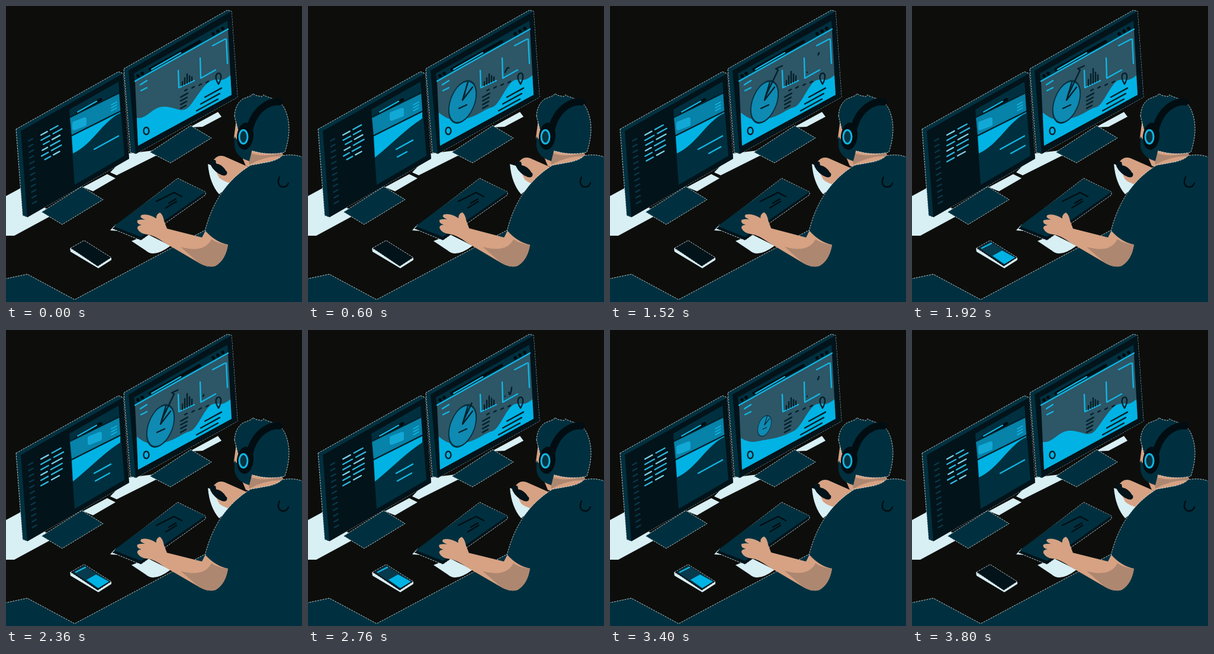
Write an HTML page that moves like this. It is 500 px wide and 500 px high and loops after 3.84 s.

```html
<!DOCTYPE html>
<html lang="en">
<head>
<meta charset="utf-8">
<title>Developer at a desk</title>
<style>
html, body { margin: 0; width: 100%; height: 100%; overflow: hidden; background: #0d0e0c; }
svg { display: block; width: 100vw; height: 100vh; }
.navy { fill: #00303f; }
.dark { fill: #03131a; }
.light { fill: #d8eff4; }
.skin { fill: #d6a283; }
.shade { fill: #ae8770; }
.cyan { fill: #00b3e4; }
.ln { fill: none; stroke-linecap: round; stroke-linejoin: round; stroke-width: 2.4; }
.c { stroke: #12b5e2; }
.k { stroke: #04202a; }
.b { stroke: #020d12; }
.edge { stroke: #e6f1f1; stroke-width: .8; stroke-dasharray: 3 1.5; }
</style>
</head>
<body>
<svg viewBox="0 0 500 500">
  <!-- desk -->
  <path class="navy edge" d="M-2 461L36 453L116 496L345 374L420 502H-2Z"/>
  <g class="light">
    <path d="M0 321L24 308L75 348V355L14 388H0Z"/>
    <path d="M130 306L171 284L185 291L147 313Z"/>
    <path d="M176 281L207 249L250 244L263 248L187 286Z"/>
    <path d="M310 205L358 179L364 187L332 204Z"/>
    <path d="M176 379L185 369L190 380Z"/>
    <path d="M212 397L240 386L278 405Q250 426 236 413Z"/>
    <path d="M341 267Q344 300 360 318L384 298L365 274Z"/>
  </g>

  <!-- left monitor -->
  <path class="navy edge" d="M60 348L128 305L164 327L95 369Z"/>
  <path class="navy edge" d="M17 208L190 111L198 114L208 258L36 357L28 354Z"/>
  <path class="dark" d="M25 211L198 114L208 258L36 357Z"/>
  <path class="navy" d="M107 175L190 128L200 253L116 302Z"/>
  <path class="ln b" style="stroke-width:5" d="M121 180L160 158"/>
  <path class="ln c" d="M121 179L153 161"/>
  <path id="band" d="M108 188L191 147L193 177L111 218Z"/>
  <path id="card" d="M-9 -1L9 -8V1L-9 8Z" stroke-width="6" stroke-linejoin="round"/>
  <path id="hill" class="cyan"/>
  <path class="ln k" d="M108 188L191 147M111 219L193 178"/>
  <path id="menu" class="ln c" style="stroke-width:1.6"/>
  <path id="pageLines" class="ln c"/>
  <path id="numbers" class="ln" stroke="#07384a"/>
  <g id="code" class="ln"></g>

  <!-- right monitor -->
  <path class="navy edge" d="M243 247L312 202L347 223L278 265Z"/>
  <path class="navy edge" d="M199 106L374 7L381 9L391 154L219 250L210 247Z"/>
  <path class="dark" d="M207 109L381 9L391 154L219 250Z"/>
  <path class="navy" d="M216 114L374 25L375 40L218 129Z"/>
  <path d="M218 128L375 40L381 150L223 236Z" fill="#2d5666"/>
  <path class="ln b" style="stroke-width:5" d="M243 107L327 60"/>
  <path class="ln c" d="M246 107L295 79"/>
  <path id="dots" class="ln b" style="stroke-width:6"/>
  <path id="wave" class="cyan"/>
  <path class="ln c" d="M218 127L375 39M227 133L238 126M228 143L238 138M349 67L370 56M372 56L374 97M291 109L292 138L318 126M328 88L329 122L354 108"/>
  <path id="labels" class="ln k"/>
  <path class="ln k" d="M359 132Q352 121 356 115Q361 111 363 117Q364 123 359 132Z"/>
  <ellipse class="ln k" cx="237" cy="211" rx="4.5" ry="6"/>
  <path id="bars" class="ln k"/>
  <path id="spark" class="ln k" pathLength="100" d="M333 112Q336 104 339 104Q340 111 342 108Q345 98 344 86Q346 78 348 83Q349 90 353 79"/>
  <g id="pie">
    <circle r="29" transform="matrix(.8 -.48 0 1.12 0 0)" fill="#0f8ab2" stroke="#063140" stroke-width="2.4"/>
    <path class="ln k" d="M9 -33L0 -3L17 -25M-6 11L7 5"/>
  </g>
  <path id="leader" class="ln k" pathLength="100" d="M263 152L284 108L280 106L291 101"/>

  <!-- keyboard and phone -->
  <path class="dark edge" d="M179 376L290 291L337 314V319L228 396Z"/>
  <path class="navy" d="M182 372L290 292L337 314L228 390Z"/>
  <path class="ln b" d="M254 330L284 315L297 322M270 341L288 330M275 333L287 326"/>
  <path class="light" d="M108 409L155 437L178 425V429L156 443L109 415Z"/>
  <path class="dark edge" d="M109 409L132 396L178 425L155 440Z"/>
  <g id="phone">
    <path d="M113 409L132 398L175 424L155 437Z" fill="#073a4c"/>
    <path class="cyan" d="M136 422L152 413L174 425L156 436Z"/>
    <path class="ln c" d="M118 409L134 401"/>
  </g>

  <!-- person -->
  <g id="mouseHand">
    <path class="skin" d="M349 263Q356 250 369 254L412 273L384 301Q366 296 360 290L352 274Z"/>
    <ellipse class="dark" cx="359" cy="273" rx="18" ry="8" transform="rotate(42 359 273)"/>
    <path class="skin" d="M354 260Q364 250 378 260L386 282L372 279Q366 268 355 266Z"/>
  </g>
  <path class="skin" d="M389 192L385 222L405 270L416 274L469 255L464 240Z"/>
  <path class="shade" d="M408 247Q438 258 466 246L469 254Q440 252 411 268Z"/>
  <path class="navy edge" d="M502 256Q487 249 466 253Q461 259 446 263L413 269Q353 306 335 385L340 440L230 502H502Z"/>
  <path class="navy" d="M330 392L337 440L230 500H350Z"/>
  <g id="arm">
    <path class="skin" d="M222 376Q221 371 229 370Q220 368 222 362Q228 360 235 361Q224 357 229 353Q240 350 254 359Q253 352 260 349Q265 352 267 363L272 376L331 391L337 380Q354 399 375 403Q371 429 354 439Q342 443 326 434L268 400Q250 387 239 386Q226 385 222 376Z"/>
    <path class="shade" d="M295 407Q335 418 347 394Q359 402 375 403Q371 429 354 439Q342 443 326 434Z"/>
  </g>
  <path class="navy edge" d="M386 186Q387 166 400 157L415 151L417 148L422 151L432 153L435 150L440 153Q465 160 471 174Q485 205 471 247Q440 254 408 242L393 214Z"/>
  <path class="navy" d="M386 220Q391 230 403 230L416 242L411 262Q389 256 386 237Z"/>
  <path class="ln b" style="stroke-width:12" d="M411 210Q417 183 435 170Q449 160 462 162"/>
  <ellipse cx="404" cy="220" rx="14" ry="23" fill="#020d12" transform="rotate(6 404 220)"/>
  <ellipse class="c" cx="401" cy="221" rx="7" ry="11.5" fill="#063341" stroke-width="3"/>
  <path class="ln b" d="M462 289Q457 300 464 305Q474 308 477 299"/>
</svg>
<script>
const LOOP = 3840, HALF = LOOP / 2;
const $ = id => document.getElementById(id);
const set = (id, name, value) => $(id).setAttribute(name, value);
const show = (id, visible) => set(id, 'visibility', visible ? 'visible' : 'hidden');
const mix = (a, b, p) => a + (b - a) * p;
const repeat = (n, draw) => Array.from({length: n}, (_, i) => draw(i)).join('');

// Smooth step from 0 to 1 between two times.
function ease(t, from, to) {
  const p = Math.min(1, Math.max(0, (t - from) / (to - from)));
  return p * p * (3 - 2 * p);
}
const pulse = (t, inFrom, inTo, outFrom, outTo) => ease(t, inFrom, inTo) - ease(t, outFrom, outTo);

let seed = 11;
const random = () => (seed = seed * 16807 % 2147483647) / 2147483647;

// Line that follows the slope of the screens.
const slanted = (x, y, w) => `M${x} ${y}l${w} ${-.55 * w}`;
const dot = (x, y) => `M${x} ${y}h.1`;

set('numbers', 'd', repeat(12, i => slanted(38 + i * .6, 228 + i * 9.6, 7)));
set('menu', 'd', repeat(3, i => slanted(178, 167 + i * 5, 9)));
set('dots', 'd', repeat(2, i => dot(223 + i * 7, 118 - i * 4)) + repeat(3, i => dot(350 + i * 8, 47 - i * 4.5)));
set('labels', 'd',
  repeat(4, i => slanted(295, 154 + i * 6.3, 12 - i)) +
  repeat(4, i => slanted(302 + i * 12, 143 - i * 4.5, 4)) +
  repeat(3, i => slanted(336 - i * 7, 154 + i * 11.5, 28 + i * 4)));

const words = [];
for (let row = 0; row < 6; row++) {
  const indent = random() * 8, first = 9 + random() * 8, second = 12 + random() * 10;
  [first, second].forEach((length, col) => {
    const el = document.createElementNS('http://www.w3.org/2000/svg', 'path');
    el.setAttribute('stroke', (row + col) % 3 ? '#2fb4da' : '#7cd0e4');
    $('code').append(el);
    words.push({el, row, indent, length, offset: col && first + 6});
  });
}

function drawCode(t) {
  const aligned = pulse(t, 1120, 1800, 3400, 3750);
  for (const {el, row, indent, length, offset} of words) {
    const typed = mix(.85 + .08 * Math.sin(2 * Math.PI * t / HALF + row * 2), 1, aligned);
    const shift = indent * (1 - aligned) + offset * typed;
    el.setAttribute('d', slanted(59 + shift, 218 + row * 9 - .55 * shift, length * typed));
  }
}

function drawPage(t) {
  const p = pulse(t % HALF, 150, 450, 1180, 1450);
  set('band', 'fill', '#0782a8');
  set('card', 'fill', '#12a8d5');
  set('card', 'stroke', '#12a8d5');
  set('card', 'transform', `translate(${mix(124, 150, p)} ${mix(199, 183, p)})`);
  set('hill', 'd', `M111 219L193 178V${mix(181, 190, p)}C165 ${mix(193, 208, p)} 145 ${mix(235, 230, p)} 113 ${mix(249, 256, p)}Z`);
  const second = 16 * ease(t, 0, 500) + 8 * ease(t, 1120, 1900) - 24 * ease(t, 2760, 3350);
  set('pageLines', 'd', slanted(149, 242, mix(41, 28, p)) +
    (second > 1 ? slanted(mix(167, 151, p), mix(249, 255, p), second) : ''));
}

function drawCharts(t) {
  const swell = pulse(t, 0, 550, 3250, 3700);
  set('wave', 'd', `M221 ${mix(189, 180, swell)}C238 ${mix(192, 194, swell)} 247 ${mix(170, 194, swell)} 267 ${mix(170, 190, swell)}` +
    `S298 ${mix(184, 174, swell)} 311 ${mix(168, 171, swell)}S336 128 350 125S363 130 379 117L381 150L223 236Z`);

  const pie = pulse(t, 120, 520, 3240, 3560);
  set('pie', 'transform', `translate(261 162) scale(${pie})`);
  const leader = 100 * pulse(t, 520, 1000, 2300, 3200);
  set('leader', 'stroke-dasharray', `${leader} 200`);
  show('leader', leader > 1);

  const rise = 1 + .6 * pulse(t, 1200, 1850, 2000, 3300);
  set('bars', 'd', repeat(5, i => `M${298 + i * 4} ${134 - i * 2}v${-rise * (6 + 9 * Math.sin(i * .8) ** 2)}`));

  // A short stroke travels along the line, twice per loop.
  const head = 100 * ease(t % HALF, 300, 1400), tail = 100 * ease(t % HALF, 500, 1700);
  set('spark', 'stroke-dasharray', `0 ${tail} ${head - tail} 200`);
  show('spark', head - tail > .5);
}

function drawPerson(t) {
  const dx = 6 * pulse(t, 0, 600, 600, 1120), dy = 3 * pulse(t, 0, 600, 2760, 3400);
  set('mouseHand', 'transform', `translate(${dx} ${dy})`);
  set('arm', 'transform', `rotate(${.35 * Math.sin(2 * Math.PI * t / 480)} 348 415)`);
  show('phone', t >= 1700 && t < 3600);
}

function frame(now) {
  const t = now % LOOP;
  for (const draw of [drawCode, drawPage, drawCharts, drawPerson]) draw(t);
  requestAnimationFrame(frame);
}
frame(performance.now());
</script>
</body>
</html>
```
